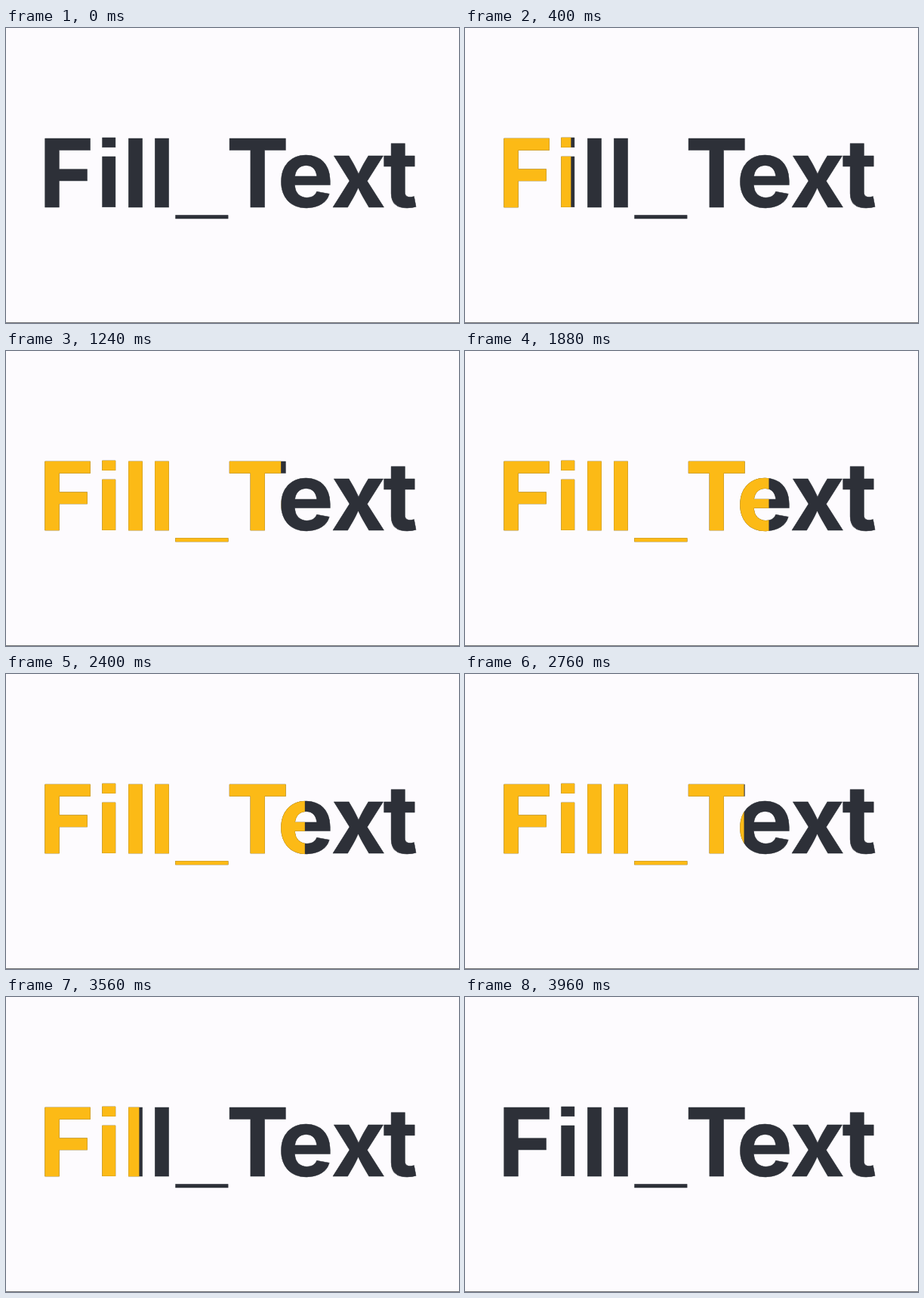
Write an HTML page that moves like this. It is 600 px wide and 390 px high and loops after 4 s.

```html
<!DOCTYPE html>
<html lang="en">
<head>
<meta charset="utf-8">
<title>Fill_Text</title>
<style>
  html, body { margin: 0; width: 100%; height: 100%; overflow: hidden; background: #fdfbfe; }
  svg { display: block; width: 600px; height: 390px; }
  text { font-weight: 700; font-optical-sizing: none; font-kerning: none; }
  use { stroke-linejoin: round; stroke-width: .5; }
  .base { fill: #2d3038; stroke: #2d3038; }
  .fill { fill: #fcba16; stroke: #fcba16; }
</style>
</head>
<body>
<svg viewBox="0 0 600 390" xmlns="http://www.w3.org/2000/svg">
  <defs>
    <text id="word"></text>
    <clipPath id="clip"><rect id="mask" width="0" height="390"/></clipPath>
  </defs>
  <rect width="600" height="390" fill="#fdfbfe"/>
  <use class="base" href="#word"/>
  <g clip-path="url(#clip)"><use class="fill" href="#word"/></g>
  <rect y="389" width="600" height="1" fill="#717175"/>
</svg>
<script>
  const SANS = "Inter, sans-serif";
  const PLAIN = "'Liberation Sans', sans-serif";
  const BASELINE = 237.1, RULE_BOTTOM = 252;
  const START = 44, SPAN = 359.5, HALF = 2000, DELAY = 25;

  // letter, centre of its ink, font, size
  const letters = [
    ["F", 82, SANS, 125],
    ["i", 136.3, PLAIN, 126.4],
    ["l", 171.5, SANS, 125],
    ["l", 206.4, SANS, 125],
    ["_", 259.2, PLAIN, 121],
    ["T", 333, SANS, 125],
    ["e", 396.6, SANS, 125],
    ["x", 466.6, SANS, 125],
    ["t", 522, SANS, 125]
  ];

  const word = document.getElementById("word");
  const mask = document.getElementById("mask");
  const ruler = document.createElement("canvas").getContext("2d");

  for (const [char, centre, font, size] of letters) {
    ruler.font = `700 ${size}px ${font}`;
    const m = ruler.measureText(char);
    const span = document.createElementNS("http://www.w3.org/2000/svg", "tspan");
    span.textContent = char;
    span.style.fontFamily = font;
    span.style.fontSize = size + "px";
    span.setAttribute("x", centre - (m.actualBoundingBoxRight - m.actualBoundingBoxLeft) / 2);
    span.setAttribute("y", char === "_" ? RULE_BOTTOM - m.actualBoundingBoxDescent : BASELINE);
    word.appendChild(span);
  }

  const bezier = (a, b, s) => 3 * a * s * (1 - s) ** 2 + 3 * b * s * s * (1 - s) + s ** 3;

  // cubic-bezier(.25, .1, .25, 1)
  function ease(p) {
    let lo = 0, hi = 1;
    for (let i = 0; i < 24; i++) {
      const mid = (lo + hi) / 2;
      if (bezier(.25, .25, mid) < p) lo = mid; else hi = mid;
    }
    return bezier(.1, 1, lo);
  }

  function draw(ms) {
    const t = (ms - DELAY + 2 * HALF) % (2 * HALF);
    const p = 1 - Math.abs(t - HALF) / HALF;
    mask.setAttribute("width", START + SPAN * ease(p));
  }

  const begin = performance.now();
  function tick() {
    draw(performance.now() - begin);
    requestAnimationFrame(tick);
  }
  tick();
</script>
</body>
</html>
```
